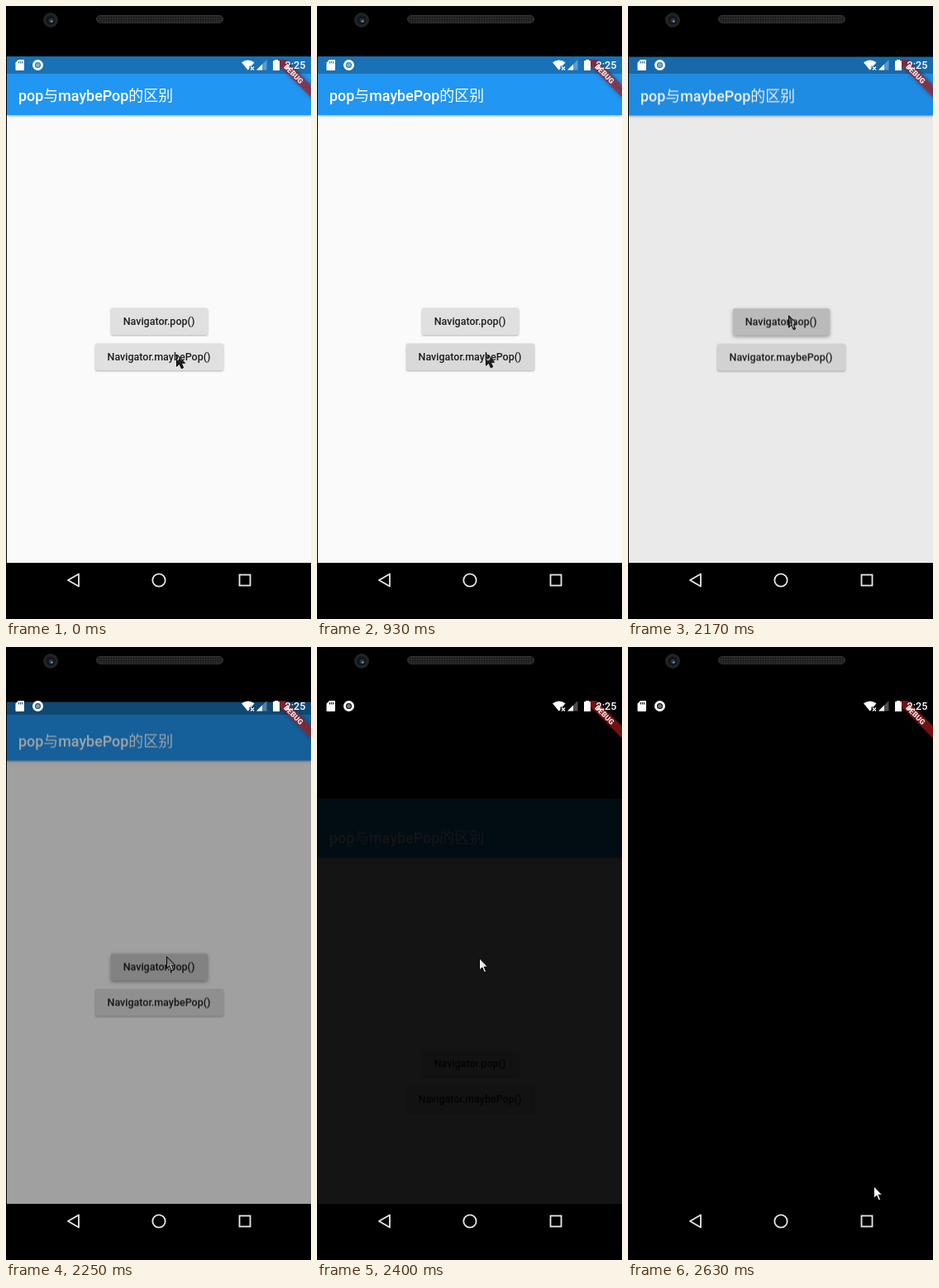
These frames come from a looping animation (369x742 px, 2.71 s). An HTML page:

```html
<!DOCTYPE html>
<html lang="zh">
<head>
<meta charset="utf-8">
<title>pop与maybePop的区别</title>
<style>
  html, body { margin: 0; width: 100%; height: 100%; overflow: hidden; background: #000; }
  svg { display: block; width: 369px; height: 742px; }
  text { font-family: Roboto, "Noto Sans CJK SC", "Noto Sans CJK", sans-serif; font-weight: 500; }

  /* Every track shares one 2710 ms loop and changes in hard steps. */
  .page, .cursor, .btn, .ink, .splash { animation: 2710ms step-end infinite; }

  .page { animation-name: leave; }
  .cursor { animation-name: point; }
  .invert { mix-blend-mode: difference; }

  .btn { fill: #e0e0e0; filter: drop-shadow(0 1px 1px rgba(0,0,0,.3)); }
  .label { font-size: 12.5px; fill: #000; fill-opacity: .87; text-anchor: middle; }
  .ink { opacity: 0; }
  .splash { r: 0; fill: #000; fill-opacity: .05; }

  .maybe .btn { animation-name: lift-maybe; }
  .maybe .ink { animation-name: ink-maybe; }
  .maybe .splash { animation-name: splash-maybe; }
  .pop .btn { animation-name: lift-pop; }
  .pop .ink { animation-name: ink-pop; }
  .pop .splash { animation-name: splash-pop; }

  @keyframes leave {
    0% { transform: none; opacity: 1; }
    80.07% { transform: translateY(.5px); opacity: .94; }
    83.02% { transform: translateY(5.5px); opacity: .64; }
    85.97% { transform: translateY(29.5px); opacity: .335; }
    88.56% { transform: translateY(122.5px); opacity: .08; }
    91.51%, 100% { transform: translateY(300px); opacity: 0; }
  }
  @keyframes point {
    0% { transform: translate(206px, 421px); }
    2.95% { transform: translate(206px, 420px); }
    8.48% { transform: translate(204px, 420px); }
    49.07% { transform: translate(203px, 418px); }
    52.02% { transform: translate(201px, 409px); }
    54.61% { transform: translate(198px, 394px); }
    57.56% { transform: translate(195px, 380px); }
    60.51% { transform: translate(194px, 374px); }
    88.56% { transform: translate(196px, 376px); }
    91.51% { transform: translate(216px, 416px); }
    94.46% { transform: translate(262px, 545px); }
    97.04%, 100% { transform: translate(297px, 652px); }
  }

  @keyframes lift-maybe {
    0%, 34.31%, 100% { filter: drop-shadow(0 1px 1px rgba(0,0,0,.3)); }
    28.78% { filter: drop-shadow(0 2px 2px rgba(0,0,0,.35)); }
  }
  @keyframes ink-maybe {
    0% { opacity: 0; }
    28.78% { opacity: .07; }
    34.31% { opacity: .03; }
    49.07% { opacity: .02; }
    54.61% { opacity: .01; }
    60.51%, 100% { opacity: 0; }
  }
  @keyframes splash-maybe {
    0% { r: 0; }
    22.5% { r: 15px; }
    28.78% { r: 50px; }
    31.36% { r: 110px; }
    34.31%, 100% { r: 0; }
  }
  @keyframes lift-pop {
    0%, 85.97%, 100% { filter: drop-shadow(0 1px 1px rgba(0,0,0,.3)); }
    77.49% { filter: drop-shadow(0 2px 2px rgba(0,0,0,.35)); }
  }
  @keyframes ink-pop {
    0% { opacity: 0; }
    77.49% { opacity: .06; }
    83.02% { opacity: .09; }
    85.97%, 100% { opacity: 0; }
  }
  @keyframes splash-pop {
    0% { r: 0; }
    74.53% { r: 15px; }
    77.49% { r: 35px; }
    80.07% { r: 75px; }
    83.02%, 100% { r: 0; }
  }
</style>
</head>
<body>
<svg viewBox="0 0 369 742">
  <defs>
    <clipPath id="screen"><rect x="1" y="61" width="368" height="613"/></clipPath>
    <clipPath id="corner"><rect x="300" y="65" width="69" height="60"/></clipPath>
    <clipPath id="popBox"><rect x="127" y="365.5" width="117" height="32.5" rx="2"/></clipPath>
    <clipPath id="maybeBox"><rect x="108" y="408.5" width="155" height="32.5" rx="2"/></clipPath>
    <pattern id="mesh" width="3" height="3" patternUnits="userSpaceOnUse">
      <rect width="3" height="3" fill="#2b2b2b"/>
      <circle cx="1.5" cy="1.5" r=".9" fill="#111"/>
    </pattern>
    <path id="arrow" d="M.5 .8V15.2L3.9 12L6.3 17.8L8.6 16.8L6.2 11.2H10.6Z"/>
  </defs>

  <rect width="369" height="742" fill="#000"/>

  <!-- phone body -->
  <circle cx="54" cy="17" r="9" fill="#222324"/>
  <circle cx="54" cy="17" r="5.5" fill="#121519"/>
  <circle cx="54.5" cy="17.5" r="2.8" fill="#22364a"/>
  <circle cx="55.3" cy="18.6" r="1.2" fill="#7fa3bd"/>
  <rect x="109.5" y="11.5" width="153" height="9" rx="4.5" fill="url(#mesh)" stroke="#333"/>

  <!-- app page -->
  <g clip-path="url(#screen)">
    <g class="page">
      <rect x="1" y="61" width="368" height="613" fill="#fafafa"/>
      <rect x="1" y="61" width="368" height="71" fill="#2196f3" style="filter:drop-shadow(0 1px 1.5px rgba(0,0,0,.35))"/>
      <text x="15" y="114.5" font-size="17.9" fill="#fff">pop<tspan font-weight="400">与</tspan>maybePop<tspan font-weight="400">的区别</tspan></text>
      <g class="pop">
        <rect class="btn" x="127" y="365.5" width="117" height="32.5" rx="2"/>
        <g clip-path="url(#popBox)">
          <rect class="ink" x="127" y="365" width="117" height="33"/>
          <circle class="splash" cx="194" cy="375"/>
        </g>
        <text class="label" x="185" y="386">Navigator.pop()</text>
      </g>
      <g class="maybe">
        <rect class="btn" x="108" y="408.5" width="155" height="32.5" rx="2"/>
        <g clip-path="url(#maybeBox)">
          <rect class="ink" x="108" y="408" width="155" height="33"/>
          <circle class="splash" cx="204" cy="420"/>
        </g>
        <text class="label" x="185" y="429">Navigator.maybePop()</text>
      </g>
    </g>
    <rect x="1" y="61" width="368" height="21" fill-opacity=".25"/>
  </g>

  <!-- corner ribbon -->
  <g clip-path="url(#corner)">
    <g transform="translate(369 61) rotate(45)">
      <rect x="-40" y="24.5" width="80" height="10.5" fill="#b71c1c" fill-opacity=".63" style="filter:drop-shadow(0 0 2.5px rgba(0,0,0,.5))"/>
      <text y="33" font-size="9" style="font-weight:900" fill="#fff" fill-opacity=".9" text-anchor="middle">DEBUG</text>
    </g>
  </g>

  <!-- status icons -->
  <g fill="#fff">
    <path fill-rule="evenodd" d="M15 65H21Q22 65 22 66V77Q22 78 21 78H12.500Q11.500 78 11.500 77V68.500ZM15 67V69.500H16V67ZM17 67V69.500H18V67ZM19 67V69.500H20V67Z"/>
    <circle cx="38.500" cy="71.500" r="5" fill="none" stroke="#fff" stroke-width="3"/>
    <circle cx="38.500" cy="71.500" r="2.500" fill-opacity=".45"/>
    <path d="M285 68.300Q292.800 62.500 300.500 68.300L297 72.500H294.500V75.500L292.800 77.800Z"/>
    <path d="M296 73.500L300 77.500M300 73.500L296 77.500" stroke="#fff" stroke-width="1.200"/>
    <path d="M303 77.500L315.500 65V77.500Z" fill-opacity=".3"/>
    <path d="M303 77.500L310 70.500V77.500Z"/>
    <path d="M325 65H329V66.300H331V78H323V66.300H325Z"/>
    <text x="337.500" y="76" font-size="12.600">2:25</text>
  </g>

  <!-- navigation keys -->
  <g fill="none" stroke="#e8e8e8" stroke-width="1.800">
    <path d="M75 695L88 687.500V702.500Z" stroke-linejoin="round"/>
    <circle cx="185" cy="695" r="7.700"/>
    <rect x="282.500" y="688.500" width="13" height="13"/>
  </g>

  <!-- the pointer inverts what lies below it, inside a black edge -->
  <g class="cursor invert"><use href="#arrow" fill="#fff"/></g>
  <g class="cursor"><use href="#arrow" fill="none" stroke="#000"/></g>
</svg>
</body>
</html>
```
